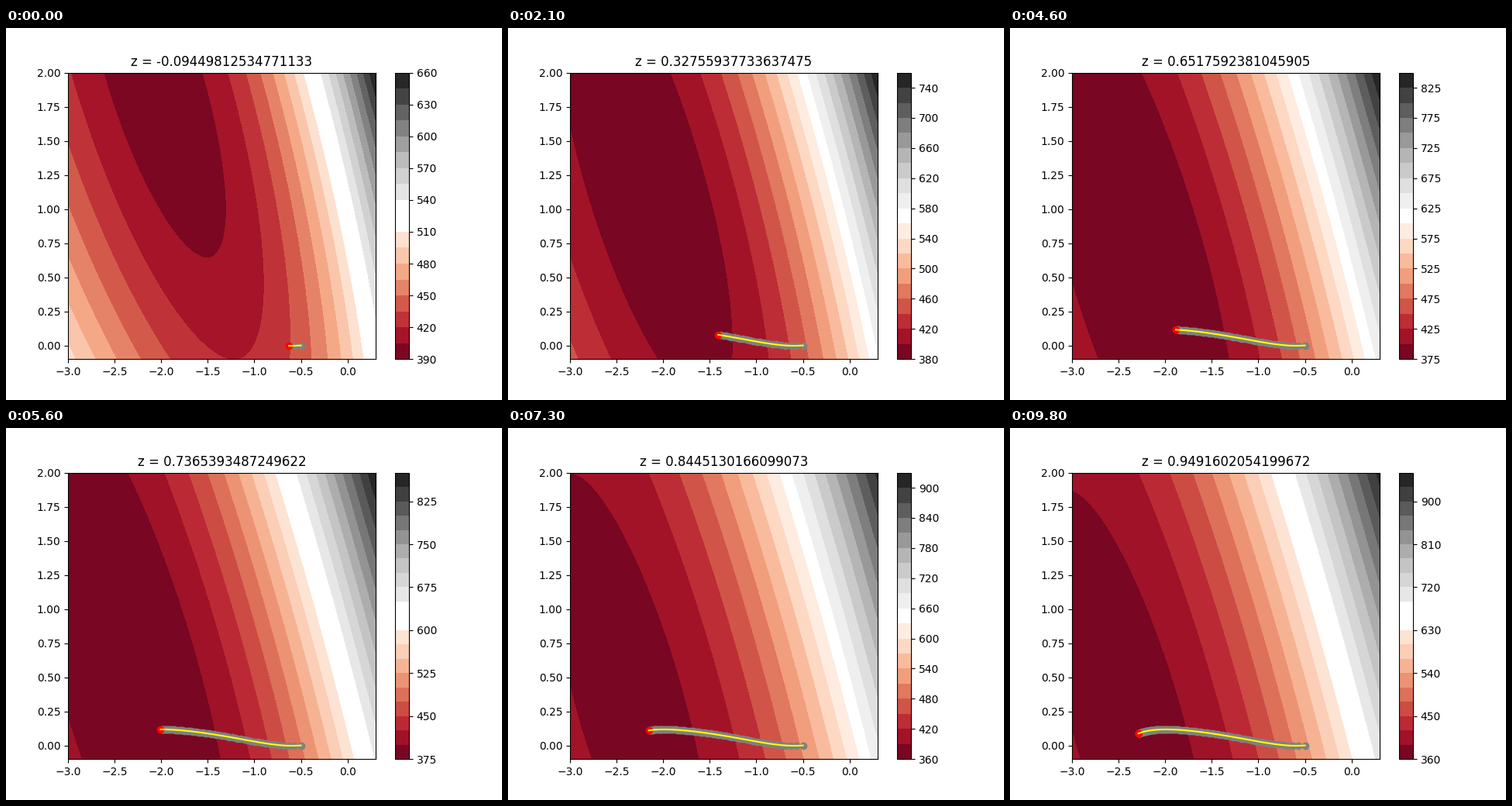
A matplotlib script for the animation above (9900 ms loop, 640x480 px).

```python
import matplotlib.pyplot as plt
import numpy as np
from matplotlib.animation import FuncAnimation
from matplotlib.colors import ListedColormap
from numpy.polynomial.hermite_e import hermegauss

FRAMES = 99
RATE = 0.001
AGE_MIN, AGE_MAX = 0.42, 80
NODES, WEIGHTS = hermegauss(7)
WEIGHTS = WEIGHTS / WEIGHTS.sum()


def scale(age):
    return (age - AGE_MIN) / (AGE_MAX - AGE_MIN)


class Group:
    """Logistic loss of one group whose ages follow a slightly skewed bell."""

    def __init__(self, flag, size, hits, age_sum, hit_age_sum, sd, skew):
        self.flag, self.size, self.hits = flag, size, hits
        bell = NODES + skew / 6 * (NODES**2 - 1)
        bell /= np.sqrt(1 + skew**2 / 18)
        self.ages = scale(age_sum / size + sd * bell)
        self.hit_age = scale(hit_age_sum / hits)

    def loss(self, x, y, z):
        base = self.flag * x + z
        total = -self.hits * (base + y * self.hit_age)
        for age, weight in zip(self.ages, WEIGHTS):
            total = total + self.size * weight * np.log1p(np.exp(base + y * age))
        return total

    def gradient(self, x, y, z):
        score = self.flag * x + z + y * self.ages
        p = self.size * WEIGHTS / (1 + np.exp(-score))
        excess = p.sum() - self.hits
        slope = p @ self.ages - self.hits * self.hit_age
        return np.array([self.flag * excess, slope, excess])


GROUPS = [
    Group(flag=1, size=453, hits=93, age_sum=13919.17, hit_age_sum=2536.67,
          sd=14.662, skew=0.42),
    Group(flag=0, size=261, hits=197, age_sum=7286, hit_age_sum=5683,
          sd=14.083, skew=0.27),
]


def descend(start, steps):
    path = [np.array(start)]
    for _ in range(steps):
        path.append(path[-1] - RATE * sum(g.gradient(*path[-1]) for g in GROUPS))
    return np.array(path).T


def white_centred(name, reach=0.11):
    """Colour map whose near-white middle is flattened to pure white."""
    colors = plt.get_cmap(name)(np.linspace(0, 1, 256))
    colors[np.linalg.norm(colors - 1, axis=1) < reach] = 1
    return ListedColormap(colors)


xs, ys, zs = descend((-0.5, 0.0, -0.1), FRAMES + 1)
X, Y = np.meshgrid(np.linspace(-3, 0.3, 100), np.linspace(-0.1, 2, 100))
CMAP = white_centred("RdGy")
fig = plt.figure(figsize=(6.4, 4.8), dpi=100)


def draw(i):
    fig.clear()
    ax = fig.add_subplot()
    z, last = float(zs[i + 1]), i + 2
    surface = sum(g.loss(X, Y, z) for g in GROUPS)
    bands = ax.contourf(X, Y, surface, 20, cmap=CMAP)
    fig.colorbar(bands, ax=ax)
    ax.scatter(xs[:last], ys[:last], color="gray")
    ax.scatter(xs[last], ys[last], color="red")
    ax.plot(xs[:last + 1], ys[:last + 1], color="yellow")
    ax.set(xlim=(-3, 0.3), ylim=(-0.1, 2), title=f"z = {z}")
    return []


anim = FuncAnimation(fig, draw, frames=FRAMES, interval=100, repeat=True, repeat_delay=0)
plt.show()
```
